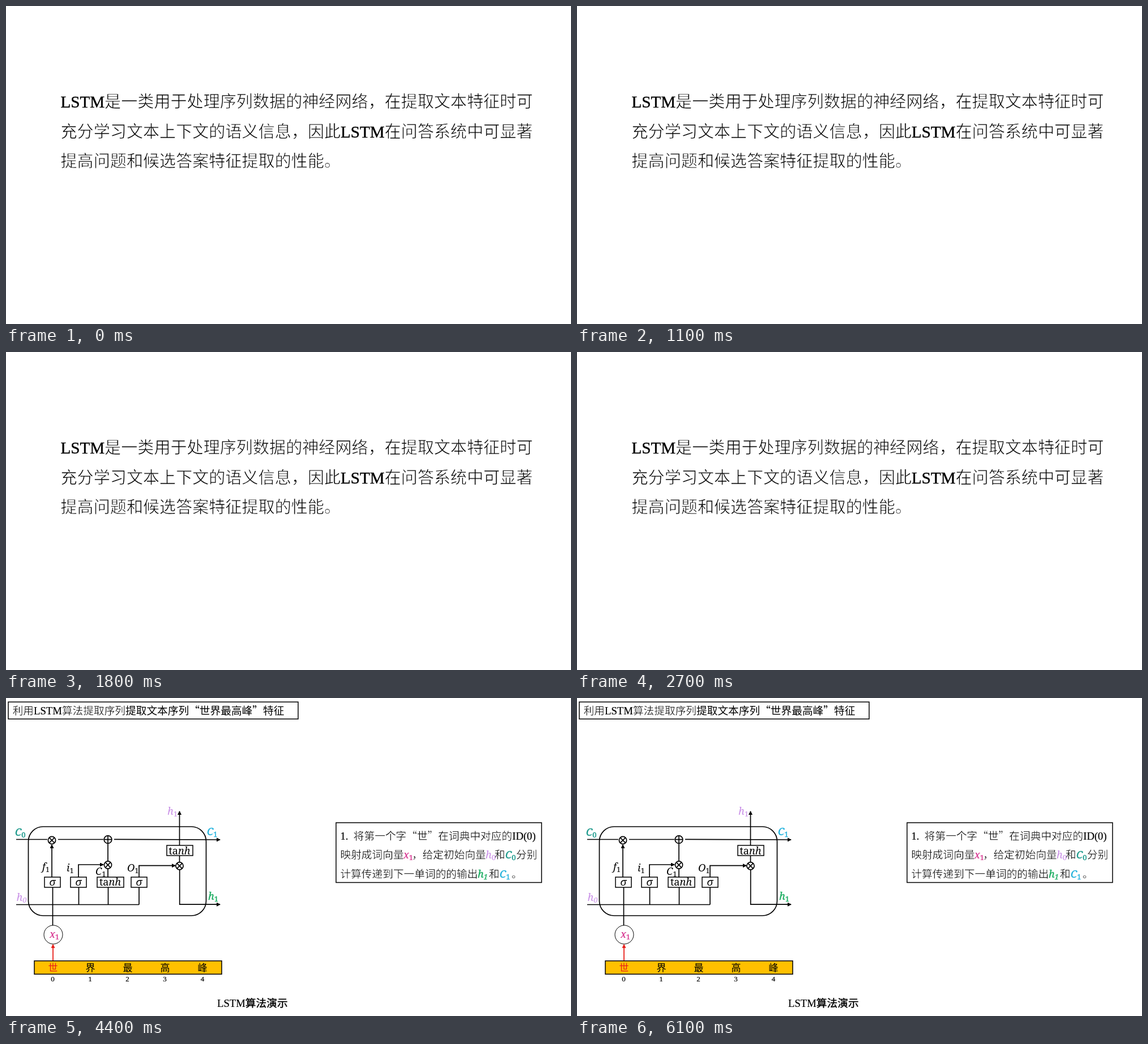
These frames come from a looping animation (998x561 px, 8000 ms). An HTML page:

```html
<!DOCTYPE html>
<html lang="zh-CN">
<head>
<meta charset="utf-8">
<title>LSTM算法演示</title>
<style>
html, body { margin: 0; width: 100%; height: 100%; overflow: hidden; background: #fff; }
svg { display: block; width: 100vw; height: 100vh; }
text { font: 400 18.7px "Noto Sans CJK SC", "Noto Sans CJK", sans-serif; white-space: pre; }
/* A white outline thins the strokes to a light, song-like weight. */
.thin { stroke: #fff; stroke-width: .4; }
.intro .thin { stroke-width: .75; }
.plain { stroke: none; }
.latin { font-family: "Liberation Serif", serif; stroke: #000; stroke-width: .2; }
.intro text { font-size: 29.1px; }
.intro .latin { stroke-width: .4; }
.medium { stroke: #000; stroke-width: .35; }
.math { font: italic 400 18px "Noto Serif", serif; }
.math .sub { font-size: 13px; }
.upright { font-style: normal; }
.mid { text-anchor: middle; }
.cells text { font-size: 17px; }
.ids text { font-size: 13px; }
.line { fill: none; stroke: #000; stroke-width: 1.7; }
.box { fill: #fff; stroke: #000; stroke-width: 1.5; }
.violet { fill: #c78ce6; }
.teal { fill: #1b998b; stroke: #1b998b; stroke-width: .4; }
.cyan { fill: #1fb1dc; stroke: #1fb1dc; stroke-width: .4; }
.green { fill: #1fae63; stroke: #1fae63; stroke-width: .4; }
.pink { fill: #d6338f; stroke: #d6338f; stroke-width: .2; }
.intro { animation: intro 8s step-end infinite; }
.demo { animation: demo 8s step-end infinite; }
@keyframes intro { 0% { visibility: visible; } 55%, 100% { visibility: hidden; } }
@keyframes demo { 0% { visibility: hidden; } 55%, 100% { visibility: visible; } }
</style>
</head>
<body>
<svg viewBox="0 0 998 561">
  <defs>
    <marker id="tip" markerUnits="userSpaceOnUse" markerWidth="8" markerHeight="8" refX="6" refY="3.5" orient="auto">
      <path d="M0 0L7 3.5L0 7z"/>
    </marker>
    <marker id="redTip" markerUnits="userSpaceOnUse" markerWidth="8" markerHeight="8" refX="6" refY="3.5" orient="auto">
      <path d="M0 0L7 3.5L0 7z" fill="#e8201a"/>
    </marker>
    <g id="times" class="line">
      <circle r="6.6"/><path d="M-4.6 -4.6L4.6 4.6M4.6 -4.6L-4.6 4.6"/>
    </g>
  </defs>

  <g class="intro">
    <text class="thin" x="96.5" y="179.3"><tspan class="latin">LSTM</tspan>是一类用于处理序列数据的神经网络，在提取文本特征时可</text>
    <text class="thin" x="96.5" y="231.5">充分学习文本上下文的语义信息，因此<tspan class="latin">LSTM</tspan>在问答系统中可显著</text>
    <text class="thin" x="96.5" y="284">提高问题和候选答案特征提取的性能。</text>
  </g>

  <g class="demo">
    <rect class="box" x="4" y="7" width="512" height="30"/>
    <text class="thin" x="11.7" y="29">利用<tspan class="latin">LSTM</tspan>算法提取序列<tspan class="plain">提取文本序列“世界最高峰”特征</tspan></text>

    <rect class="line" x="39.5" y="227" width="314" height="157" rx="26"/>
    <g class="line">
      <path d="M18 249.5H73M92 249.5H172"/>
      <path d="M191 249.3L378 250" marker-end="url(#tip)"/>
      <path d="M18 364.5H235M128.5 334V364.5M180.5 334V364.5M235 334V364.5M82.5 334V401"/>
      <path d="M81 316V259" marker-end="url(#tip)"/>
      <path d="M128 316V294H172" marker-end="url(#tip)"/>
      <path d="M180 316V301M180 288V257"/>
      <path d="M235 316V295.7H299" marker-end="url(#tip)"/>
      <path d="M306.5 290V278"/>
      <path d="M306.5 260V200" marker-end="url(#tip)"/>
      <path d="M306.7 303V364.2H378" marker-end="url(#tip)"/>
      <circle cx="180" cy="249.7" r="6.8"/><path d="M173 249.7H187M180 243V257"/>
    </g>
    <use href="#times" x="81" y="251"/>
    <use href="#times" x="180" y="294.5"/>
    <use href="#times" x="306.5" y="296.3"/>

    <g class="box">
      <rect x="68" y="316" width="28" height="18"/>
      <rect x="114" y="316" width="28" height="18"/>
      <rect x="161" y="316" width="47" height="18"/>
      <rect x="221" y="316" width="28" height="18"/>
      <rect x="284" y="260" width="46" height="18"/>
    </g>
    <g class="mid">
      <text class="math" x="82" y="331">σ</text>
      <text class="math" x="128" y="331">σ</text>
      <text class="math" x="235" y="331">σ</text>
      <text class="math" x="184" y="331"><tspan class="upright">ta</tspan>nh</text>
      <text class="math" x="306.5" y="275.5"><tspan class="upright">ta</tspan>nh</text>
    </g>

    <text class="math violet" x="285" y="206">h<tspan class="sub upright" dy="3">1</tspan></text>
    <text class="math teal" x="16" y="243">C<tspan class="sub upright" dy="3">0</tspan></text>
    <text class="math cyan" x="355" y="242">C<tspan class="sub upright" dy="3">1</tspan></text>
    <text class="math violet" x="18.5" y="358">h<tspan class="sub" dy="3">0</tspan></text>
    <text class="math green" x="357" y="356">h<tspan class="sub upright" dy="3">1</tspan></text>
    <text class="math" x="64" y="304">f<tspan class="sub upright" dy="3">1</tspan></text>
    <text class="math" x="107" y="306">i<tspan class="sub upright" dy="3">1</tspan></text>
    <text class="math" x="158" y="312">C<tspan class="sub upright" dy="3">1</tspan></text>
    <text class="math" x="214" y="306">O<tspan class="sub upright" dy="3">1</tspan></text>

    <circle class="box" cx="83.5" cy="417.5" r="16.5" style="stroke-width:1"/>
    <text class="math pink" x="77" y="423">x<tspan class="sub upright" dy="3">1</tspan></text>
    <path d="M83 463V435" stroke="#e8201a" stroke-width="1.8" marker-end="url(#redTip)"/>

    <rect class="box" x="50" y="463.7" width="331" height="23.5" style="fill:#ffc000"/>
    <g class="cells mid">
      <text x="83" y="481.5" fill="#e8201a">世</text>
      <text x="149" y="481.5">界</text>
      <text x="215" y="481.5">最</text>
      <text x="281" y="481.5">高</text>
      <text x="347" y="481.5">峰</text>
    </g>
    <g class="ids mid">
      <text class="latin" x="82.5" y="500">0</text>
      <text class="latin" x="148.5" y="500">1</text>
      <text class="latin" x="214.5" y="500">2</text>
      <text class="latin" x="280.5" y="500">3</text>
      <text class="latin" x="347" y="500">4</text>
    </g>
    <text class="medium" x="373" y="545"><tspan class="latin">LSTM</tspan>算法演示</text>

    <rect class="box" x="583" y="220" width="363" height="105.5"/>
    <g class="thin">
      <text x="590.5" y="250"><tspan class="latin">1.  </tspan>将第一个字“世”在词典中对应的<tspan class="latin">ID(0)</tspan></text>
      <text x="590.5" y="283">映射成词向量</text>
      <text x="717" y="283">，给定初始向量</text>
      <text x="863" y="283">和</text>
      <text x="901" y="283">分别</text>
      <text x="590.5" y="317">计算传递到下一单词的的输出</text>
      <text x="853" y="317">和</text>
      <text x="893" y="317">。</text>
    </g>
    <text class="math pink" x="702" y="283">x<tspan class="sub upright" dy="3">1</tspan></text>
    <text class="math violet" x="847" y="283">h<tspan class="sub upright" dy="3">0</tspan></text>
    <text class="math teal" x="882" y="283">C<tspan class="sub upright" dy="3">0</tspan></text>
    <text class="math green" x="833" y="317">h<tspan class="sub" dy="3">1</tspan></text>
    <text class="math cyan" x="872" y="317">C<tspan class="sub upright" dy="3">1</tspan></text>
  </g>
</svg>
</body>
</html>
```
